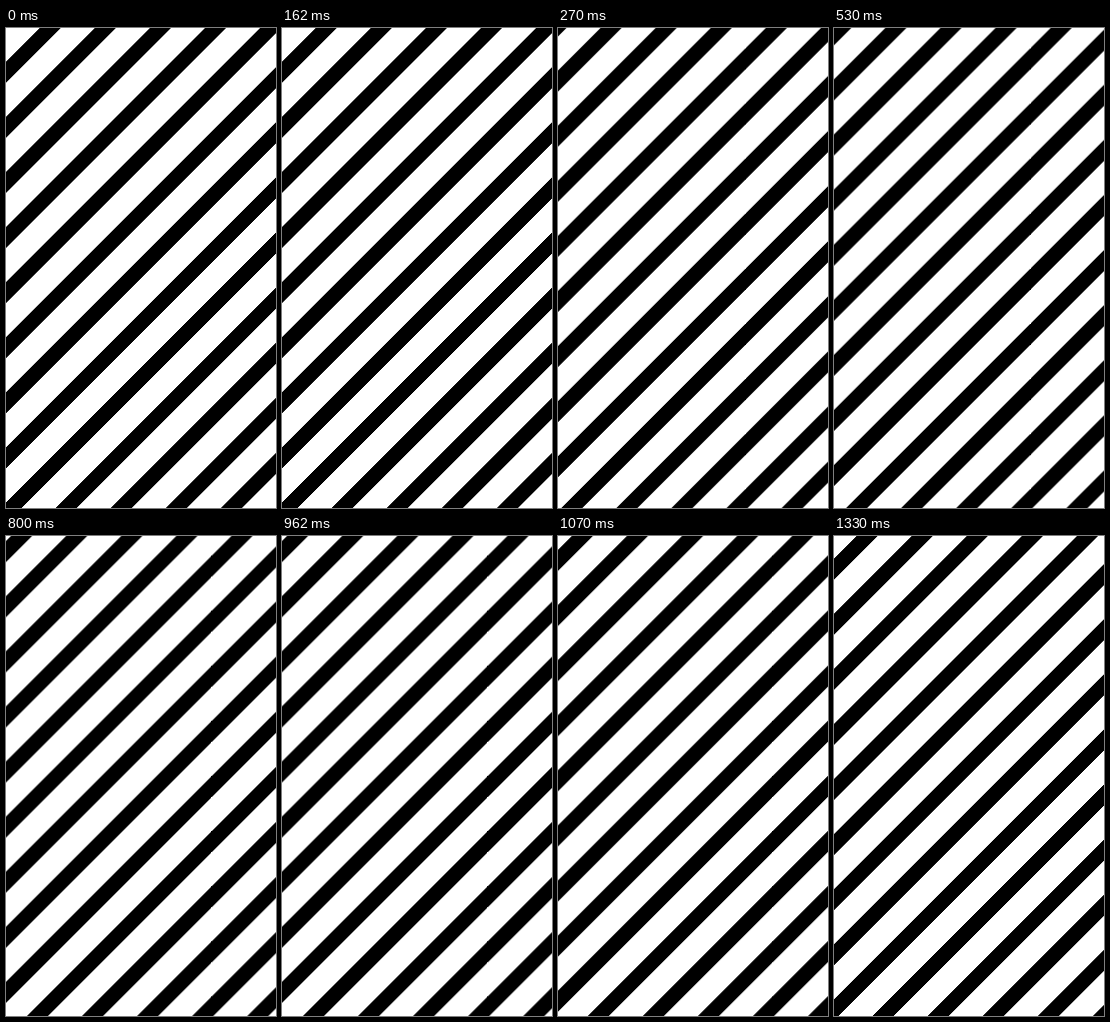
An HTML page without scripts that plays this animation: 270x480 px, repeating every 1.59 s.

```html
<!DOCTYPE html>
<html lang="en">
<head>
<meta charset="utf-8">
<title>Diagonal stripes</title>
<style>
  html, body {
    margin: 0;
    width: 100%;
    height: 100%;
    overflow: hidden;
    background: #fff;
  }
  .stage {
    position: relative;
    width: 270px;
    height: 480px;
    overflow: hidden;
  }
  /* 55.1px horizontal period, with a thin blend on each edge for smoothing */
  .stripes {
    --step: 8.8px;
    position: absolute;
    top: 0;
    left: -75.7px;
    width: 800px;
    height: 800px;
    background: repeating-linear-gradient(135deg,
      #000 0 14.2px, #fff 14.9px 38.26px, #000 38.96px);
    animation: slide 1590ms step-end infinite;
  }
  @keyframes slide {
    0%      { transform: translateX(0); }
    16.981% { transform: translateX(var(--step)); }
    33.333% { transform: translateX(calc(2 * var(--step))); }
    50.314% { transform: translateX(calc(3 * var(--step))); }
    67.295% { transform: translateX(calc(4 * var(--step))); }
    83.647% { transform: translateX(calc(5 * var(--step))); }
  }
</style>
</head>
<body>
<div class="stage"><div class="stripes"></div></div>
</body>
</html>
```
